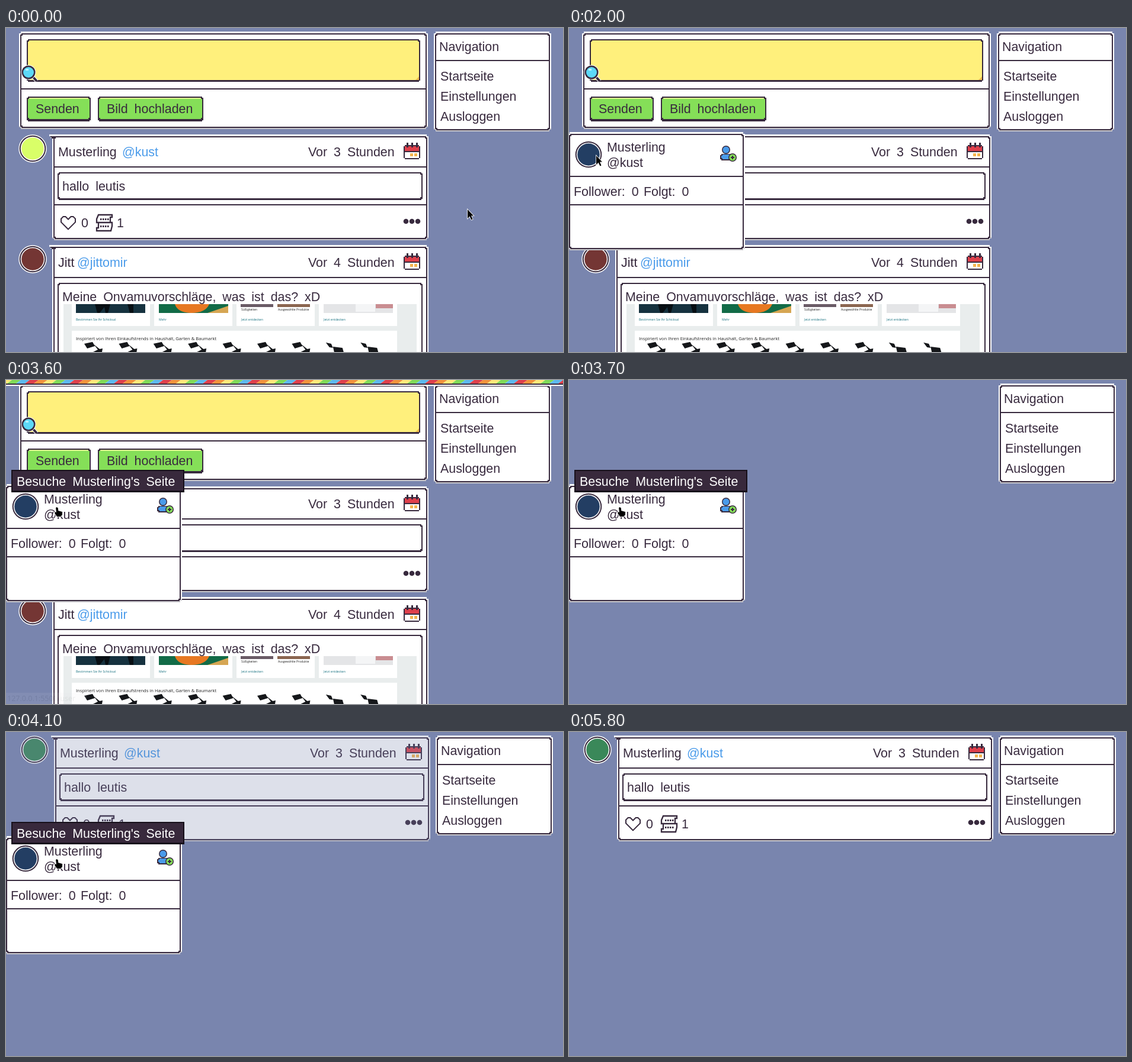
Recreate the animation shown at these times as an HTML page with a canvas. Size 940 by 548 pixels, loop 6700 ms.

```html
<!DOCTYPE html>
<html lang="de">
<head>
<meta charset="utf-8">
<style>
  html, body { margin: 0; width: 100%; height: 100%; overflow: hidden; background: #7985ae; }
  canvas { display: block; }
</style>
</head>
<body>
<canvas id="stage" width="940" height="548"></canvas>
<script>
const W = 940, H = 548, LOOP = 6700, STEP = 100;
const INK = '#382a3e', WHITE = '#fff', BLUE = '#4a9bea', GREEN = '#85df58', RED = '#df3f4b';
const screen = document.getElementById('stage').getContext('2d');
const layer = Object.assign(document.createElement('canvas'), { width: W, height: H }).getContext('2d');
let g = screen;

// ---- drawing helpers ----
function rect(x, y, w, h, color = INK) {
  g.fillStyle = color;
  g.fillRect(x, y, w, h);
}

function chip(x, y, w, h, color, corner = 2) { // rectangle with stepped corners
  rect(x + corner, y, w - 2 * corner, h, color);
  rect(x, y + corner, w, h - 2 * corner, color);
}

function frame(x, y, w, h, fill, bottom = 2) {
  chip(x, y, w, h, INK);
  chip(x + 2, y + 2, w - 4, h - 2 - bottom, fill);
}

function panel(x, y, w, h, ...dividers) {
  chip(x, y, w, h, '#c9c8cc', 3);
  chip(x, y - 1, w, h - 1, WHITE, 3);
  frame(x + 2, y + 2, w - 4, h - 4, WHITE);
  for (const d of dividers) rect(x + 2, y + d, w - 4, 2);
}

function text(str, x, y, color = INK, size = 21.4, font = '"Liberation Sans", Arial, sans-serif') {
  g.font = `${size}px ${font}`;
  g.wordSpacing = size > 20 ? '5px' : '0px';
  g.fillStyle = color;
  g.fillText(str, x, y);
}

const small = (str, x, y, color, size = 5.2) => text(str, x, y, color, size, '"Open Sans", sans-serif');

function disc(x, y, r, color) {
  g.fillStyle = color;
  g.beginPath();
  g.arc(x, y, r, 0, 7);
  g.fill();
}

function shape(d, fill, stroke, width = 2) {
  const path = new Path2D(d);
  g.lineWidth = width;
  if (stroke) { g.strokeStyle = stroke; g.stroke(path); }
  if (fill) { g.fillStyle = fill; g.fill(path); }
}

function at(x, y, paint) {
  g.save();
  g.translate(x, y);
  paint();
  g.restore();
}

function fade(alpha, paint) {
  if (alpha <= 0) return;
  g = layer;
  g.clearRect(0, 0, W, H);
  paint();
  g = screen;
  g.globalAlpha = alpha;
  g.drawImage(layer.canvas, 0, 0);
  g.globalAlpha = 1;
}

// ---- icons ----
function avatar(x, y, color) {
  disc(x, y, 23.7, WHITE);
  disc(x, y, 22.3, INK);
  disc(x, y, 20.3, WHITE);
  disc(x, y, 18.8, color);
}

function calendar() {
  chip(0, 4, 28, 24, INK);
  rect(2, 6, 24, 8, RED);
  rect(2, 16, 24, 10, WHITE);
  for (const x of [5, 13, 21]) rect(x, 0, 3, 8);
  for (const x of [11, 18]) rect(x, 18, 5, 5, '#f5b44e');
}

function heart() {
  shape('M14 23L3 12V7L6 4H9L14 9L19 4H22L25 7V12Z', WHITE, INK, 4);
}

function scroll() {
  shape('M5 1H28V5H25V14H28V20L26 28H2V23H5V14H2V8L5 1Z M4 14H26', null, INK, 2.3);
  for (const y of [7, 19]) for (let x = 8; x < 22; x += 4) rect(x, y, 2.5, 3);
}

function magnifier() {
  shape('M17 18L25 27', null, WHITE, 6);
  shape('M17 18L25 27', null, INK, 4);
  disc(11, 12, 12.5, WHITE);
  disc(11, 12, 11.5, INK);
  disc(11, 12, 9, '#5cd9f8');
  rect(6, 6, 5, 3, '#b9f3ff');
}

function addPerson() {
  disc(10, 7, 7, INK);
  chip(0, 14, 22, 11, INK);
  disc(10, 7, 5.5, BLUE);
  chip(2, 15, 18, 8, BLUE);
  disc(21, 20, 7, INK);
  disc(21, 20, 5.5, GREEN);
  rect(20, 17, 2, 6);
  rect(18, 19, 6, 2);
}

// ---- page parts ----
function navigation(x) {
  panel(x, 7, 198, 168, 47);
  text('Navigation', x + 9, 39);
  ['Startseite', 'Einstellungen', 'Ausloggen'].forEach((label, i) => text(label, x + 11, 89 + 34 * i));
}

function button(label, x, w) {
  frame(x, 116, w, 42, GREEN, 4);
  rect(x + 4, 118, w - 8, 2, '#dcf68d');
  text(label, x + 15, 144);
}

function composer() {
  panel(22, 7, 690, 164, 95);
  frame(35, 19, 664, 72, '#fff07c', 3);
  shape('M697 82V88H691Z', '#f0bd4c');
  at(27, 63, magnifier);
  button('Senden', 35, 108);
  button('Bild hochladen', 155, 178);
}

// Origin is the top left corner of the post panel.
function postHead(h, dividers, color, name, handle, handleX, age) {
  avatar(-33, 23, color);
  panel(0, 0, 635, h, ...dividers);
  shape('M-5 -1H8V3H2V8H0V5H-3V2H-5Z', WHITE);
  shape('M-3 2H10V4H4V9H2V6H-1V4H-3Z', INK);
  text(name, 10, 36);
  text(handle, handleX, 36, BLUE);
  text(`Vor ${age} Stunden`, 432, 36);
  at(593, 13, calendar);
}

function firstPost(color) {
  postHead(178, [53, 117], color, 'Musterling', '@kust', 118, 3);
  frame(9, 63, 616, 47, WHITE, 3);
  text('hallo leutis', 17, 94);
  at(13, 135, heart);
  text('0', 49, 156);
  at(73, 134, scroll);
  text('1', 109, 156);
  for (const x of [597, 607, 617]) disc(x, 146, 4.3, INK);
}

function lamp(x, low) {
  at(x, 531, () => shape(low
    ? 'M0 1L9 3L12 10L6 9Z M12 8L28 10L30 17H14Z'
    : 'M1 3L15 0L19 7L6 11Z M17 4L27 12L32 11L31 17H16L24 13Z', '#15171a'));
}

function shopPicture() {
  const teal = '#16707f';
  rect(97, 467, 596, 81, '#e9eded');
  for (const x of [111, 250, 389, 528]) rect(x, 467, 132, 37, WHITE);
  rect(111, 512, 549, 36, WHITE);
  rect(118, 467, 117, 15, '#16323f');
  shape('M150 467H176L172 482H168L166 472L158 482H154Z M205 467H215V482H209Z', '#080f14');
  rect(258, 467, 117, 15, '#126b47');
  shape('M285 467H343Q337 482 312 482Q289 481 285 467Z', '#e77822');
  shape('M340 482L375 470V482Z', '#d6a653');
  rect(396, 467, 55, 5, '#6a5b66');
  rect(458, 467, 55, 5, '#8b6650');
  rect(536, 467, 117, 15, '#e4e5e7');
  rect(590, 467, 33, 13, '#f4f5f6');
  rect(624, 467, 29, 7, '#c98d91');
  small('Süßigkeiten', 397, 478, '#222', 5);
  small('Ausgewählte Produkte', 459, 478, '#222', 5);
  small('Bestimmen Sie Ihr Schicksal', 118, 495, teal);
  small('Mehr', 258, 495, teal);
  small('Jetzt entdecken', 397, 495, teal);
  small('Jetzt entdecken', 536, 495, teal);
  small('Inspiriert von Ihren Einkaufstrends in Haushalt, Garten & Baumarkt', 118, 528, '#222', 7.6);
  for (let i = 0; i < 9; i++) lamp(131 + 58.4 * i, i > 6);
}

function homePage() {
  composer();
  navigation(722);
  at(78, 181, () => firstPost('#d9fe68'));
  at(78, 368, () => {
    postHead(240, [53], '#743634', 'Jitt', '@jittomir', 42, 4);
    frame(9, 63, 616, 200, WHITE);
  });
  text('Meine Onvamuvorschläge, was ist das? xD', 95, 462);
  shopPicture();
}

function popup() {
  panel(-2, 177, 299, 199, 73, 121);
  avatar(33, 214, '#233e63');
  text('Musterling', 64, 209);
  text('@kust', 64, 235);
  at(255, 199, addPerson);
  text('Follower: 0', 8, 284);
  text('Folgt: 0', 126, 284);
}

function tooltip() {
  rect(9, 152, 292, 38, '#17101b');
  rect(11, 154, 288, 33, '#38293c');
  text("Besuche Musterling's Seite", 18, 179, WHITE);
}

function statusBar() {
  rect(0, 529, 136, 19, '#dfe1e6');
  small('127.0.0.1:5500/user', 2, 543, '#444', 12.5);
}

function loadingBar() {
  const colors = ['#ffe97a', '#7fda58', '#5db9ee', RED, '#f2933c'];
  rect(0, 0, W, 10, WHITE);
  for (let i = 0; i < 64; i++) shape(`M${i * 15 - 5} 0h15l-8 6h-15Z`, colors[i % 5]);
  rect(0, 6, W, 2);
}

// ---- motion ----
const pointerPath = [
  [300, 779, 306], [800, 435, 284], [900, 435, 284], [1500, 53, 254], [1600, 49, 253],
  [1700, 46, 215], [2700, 46, 215], [2800, 84, 215], [4300, 84, 215], [4600, 326, 232],
  [4900, 383, 262], [5200, 383, 262], [5300, 413, 278], [5700, 76, 176]
];

const ramp = (t, from, to) => Math.min(1, Math.max(0, (t - from) / (to - from)));

function pointerAt(t) {
  let [, x, y] = pointerPath[0];
  for (let i = 1; i < pointerPath.length; i++) {
    const [t0, x0, y0] = pointerPath[i - 1], [t1, x1, y1] = pointerPath[i];
    if (t < t0) break;
    const k = ramp(t, t0, t1), e = k * k * (3 - 2 * k);
    x = x0 + (x1 - x0) * e;
    y = y0 + (y1 - y0) * e;
  }
  return [Math.round(x), Math.round(y)];
}

function pointer(t) {
  if (t >= 5800) return;
  const hand = t >= 2800 && t < 4400;
  at(...pointerAt(t), () => shape(hand
    ? 'M0 1L2 0L4 2V6L11 8V13L8 16H2L-2 10L-1 8L1 9Z'
    : 'M0 1V16L3.5 12.5L6.5 18.5L8.5 17.5L6 11.5H10Z', '#000', WHITE, 1.6));
}

function draw(t) {
  rect(0, 0, W, H, '#7985ae');
  if (t < 3700) {
    homePage();
  } else {
    navigation(725);
    fade(ramp(t, 3800, 4200), () => at(81, 7, () => firstPost('#3a8859')));
  }
  const leaving = 1 - ramp(t, 4300, 4600);
  fade(Math.min(ramp(t, 1600, 2000), leaving), popup);
  fade(Math.min(ramp(t, 2700, 3000), leaving), tooltip);
  fade(Math.min(ramp(t, 2900, 3200), 1 - ramp(t, 3400, 3620)), statusBar);
  if (t >= 3500 && t < 3700) loadingBar();
  pointer(t);
}

const start = performance.now();
function tick() {
  const t = (performance.now() - start) % LOOP;
  draw(Math.floor(t / STEP) * STEP);
  requestAnimationFrame(tick);
}
tick();
</script>
</body>
</html>
```
